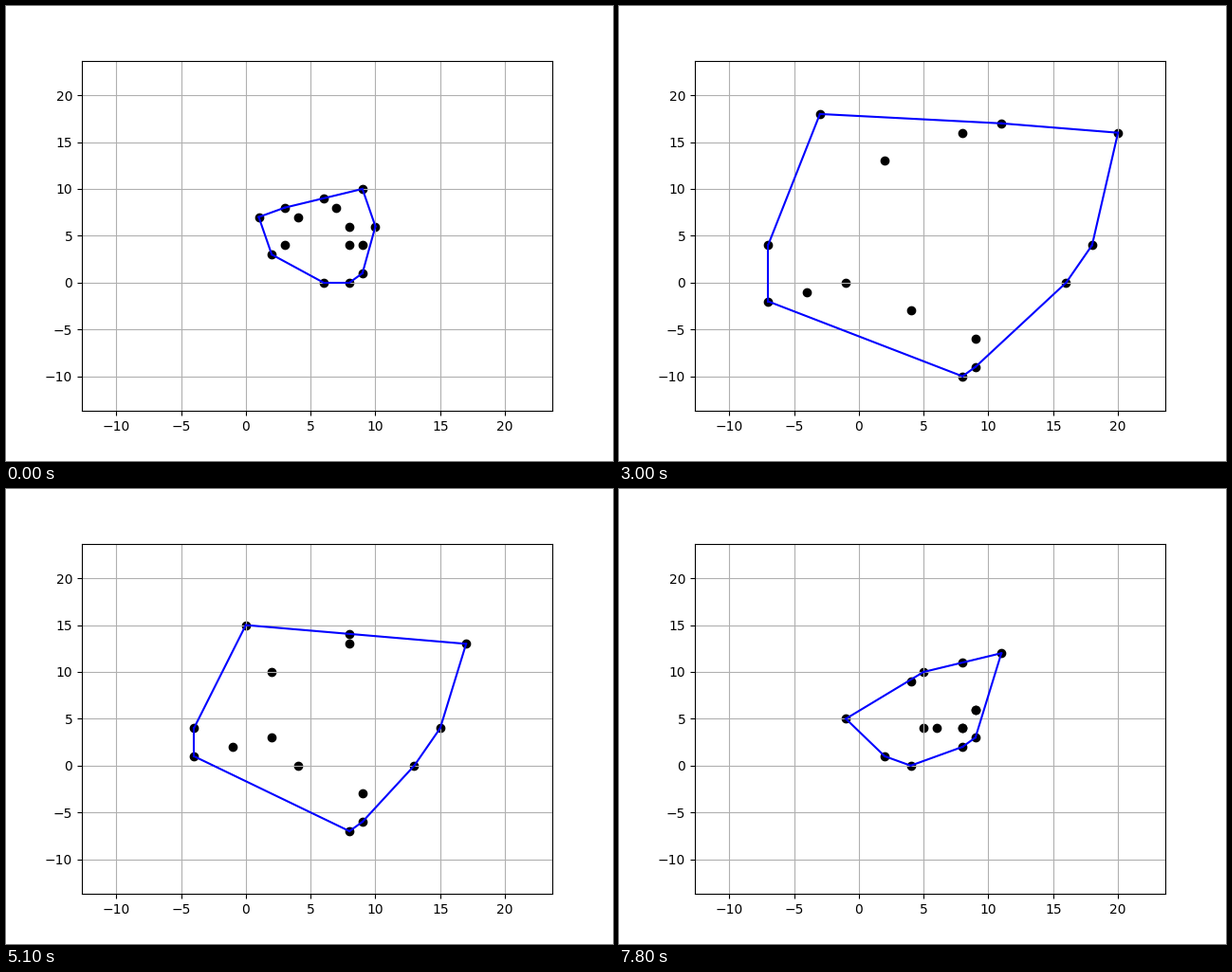
Write a matplotlib script that moves like this. It is 640 by 480 pixels and loops after 8000 ms.

```python
import matplotlib.pyplot as plt
import numpy as np
from matplotlib.animation import FuncAnimation

TICK_MS = 100
FRAMES = 80
TICKS_PER_STEP = 3
TURN_STEP = 12
CENTRE, DEAD_ZONE = 5, 6

# Places of the dots at their widest spread
WIDEST = np.array([
    (-5, 20), (13, 19), (22, 18), (8, 18), (2, 15),
    (-9, 4), (-9, -4), (-6, -3), (-3, -2), (4, -5),
    (9, -8), (9, -11), (8, -12), (18, 0), (20, 4),
])
# Each dot drifts outward along every axis on which it lies far from the centre
OFFSET = WIDEST - CENTRE
DRIFT = np.sign(OFFSET) * (abs(OFFSET) > DEAD_ZONE)


def cross(o, a, b):
    return (a[0] - o[0]) * (b[1] - o[1]) - (a[1] - o[1]) * (b[0] - o[0])


def half_hull(points):
    chain = []
    for p in points:
        while len(chain) > 1 and cross(chain[-2], chain[-1], p) <= 0:
            chain.pop()
        chain.append(p)
    return chain


def closed_hull(points):
    ordered = sorted({(int(x), int(y)) for x, y in points})
    return half_hull(ordered) + half_hull(ordered[::-1])[1:]


fig, ax = plt.subplots(figsize=(6.4, 4.8), dpi=100)
ax.set_xlim(-12.65, 23.65)
ax.set_ylim(-13.7, 23.7)
ax.grid(True)
dots = ax.scatter(*WIDEST.T, color="black")
# One line per hull edge, so that upright edges snap to whole pixels
edges = [ax.plot([], [], color="blue")[0] for _ in WIDEST]


def update(tick):
    step = tick // TICKS_PER_STEP
    points = WIDEST - abs(step - TURN_STEP) * DRIFT
    dots.set_offsets(points)

    hull = closed_hull(points)
    for i, edge in enumerate(edges):
        ends = np.array(hull[i:i + 2])
        if len(ends) == 2:
            edge.set_data(*ends.T)
        else:
            edge.set_data([], [])
    return dots, *edges


anim = FuncAnimation(fig, update, frames=FRAMES, interval=TICK_MS,
                     repeat=True, repeat_delay=0)
plt.show()
```
